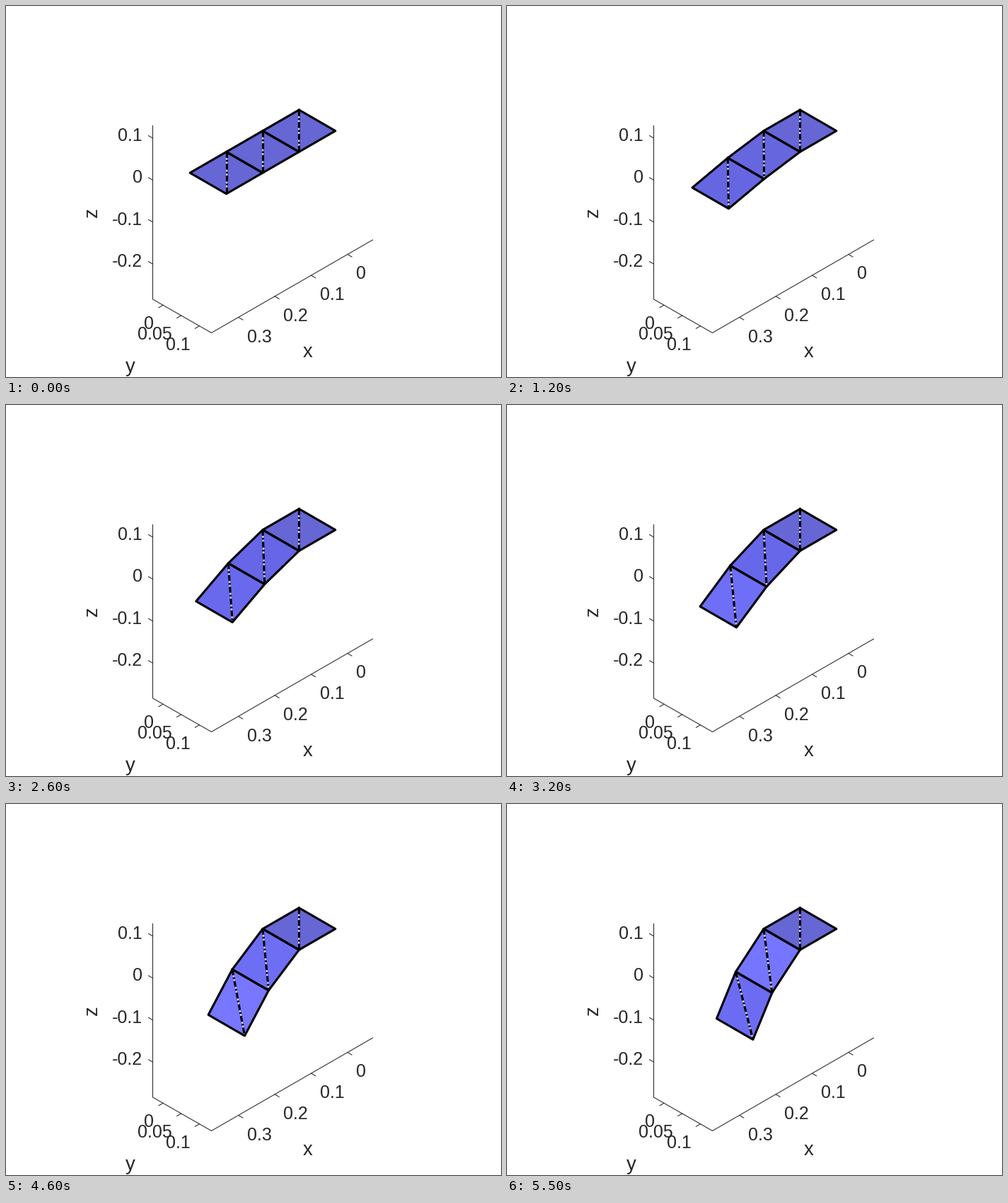
These frames come from a looping animation (700 by 525 pixels, 5.6 s). A matplotlib script:

```python
import numpy as np
import matplotlib.pyplot as plt
from matplotlib.animation import FuncAnimation
from matplotlib.patches import Polygon

W, H, DPI = 700, 525, 100
FRAMES, INTERVAL = 56, 100
PX = 72 / DPI                       # points per pixel
INK = "#262626"

plt.rcParams["font.family"] = "Liberation Sans"
plt.rcParams["toolbar"] = "None"
fig = plt.figure(figsize=(W / DPI, H / DPI), dpi=DPI, facecolor="white")
ax = fig.add_axes([0, 0, 1, 1])
ax.set_xlim(0, W)
ax.set_ylim(H, 0)
ax.axis("off")

# isometric projection, lengths in panel sides
ORIGIN = np.array([414.4, 147.0])
EX = np.array([-51.4, 29.7])
EY = np.array([51.4, 29.7])
EZ = np.array([0, -59.4])

RATES = np.radians([0, 0.722, 1.06])   # tilt of each panel per step
VIEW = np.ones(3) / np.sqrt(3)
LIGHT = np.array([1, 0, 1]) / np.sqrt(2)


def shade(tilt):
    """Lit blue face, 60 % opaque on white."""
    n = np.array([np.sin(tilt), 0, np.cos(tilt)])
    cos_l = n @ LIGHT
    mirror = 2 * cos_l * n - LIGHT
    spec = 0.9 * max(mirror @ VIEW, 0) ** 10
    lit = np.array([0, 0, 0.3 + 0.6 * cos_l]) + spec
    return 0.4 + 0.6 * np.clip(lit, 0, 1)


def line(points, width=1.05, color=INK, **kw):
    x, y = zip(*points)
    return ax.plot(x, y, color=color, lw=width * PX, **kw)[0]


def label(x, y, text, size=25, **kw):
    ax.text(x, y, text, fontsize=size * PX, color=INK, **kw)


def draw_axes():
    line([(207.5, 169.5), (207.5, 415), (290.5, 462.5), (518.5, 331)],
         solid_joinstyle="miter")
    for i, text in enumerate(["0.1", "0", "-0.1", "-0.2"]):
        y = 187 + 59.4 * i
        line([(207.5, y), (201.5, y - 3.5)])
        label(193.2, y + 4, text, ha="right", va="baseline")
    for i, text in enumerate(["0", "0.05", "0.1"]):
        x, y = 222 + 25.7 * i, 423.3 + 14.75 * i
        line([(x, y), (x - 6, y + 3.5)])
        label(209.4 + 25.7 * i, 457.3 + 14.9 * i, text,
              ha="right", va="baseline")
    for i, text in enumerate(["0", "0.1", "0.2", "0.3"]):
        x, y = 483 - 51.4 * i, 351.5 + 29.7 * i
        line([(x, y), (x + 6, y + 3.5)])
        label(495.2 - 51.4 * i, 386.5 + 29.7 * i, text,
              ha="left", va="baseline")
    label(427, 497, "x", 27.5, ha="center", va="baseline")
    label(176, 518, "y", 27.5, ha="center", va="baseline")
    label(135, 292, "z", 27.5, ha="right", va="center", rotation=90)


draw_axes()

START = [(0, 0), (0, 0)]
faces, seams, edges, folds = [], [], [], []
for _ in RATES:
    faces.append(ax.add_patch(Polygon([(0, 0)] * 4, lw=0, zorder=3)))
    seams.append(line(START, 1.8, "#d8d8e8", zorder=4,
                      solid_capstyle="butt"))
    edges.append(line(START, 3.1, "black", zorder=6,
                      solid_joinstyle="round", solid_capstyle="round"))
    folds.append(line(START, 3.1, "black", zorder=5,
                      linestyle=(0, (2.7, 0.95, 0.8, 0.95)),
                      dash_capstyle="butt"))


def update(step):
    p = ORIGIN
    for rate, face, seam, edge, fold in zip(RATES, faces, seams, edges, folds):
        tilt = rate * step
        q = p + np.cos(tilt) * EX - np.sin(tilt) * EZ
        quad = np.array([p, q, q + EY, p + EY])
        face.set_xy(quad)
        face.set_facecolor(shade(tilt))
        edge.set_data(*np.vstack([quad, quad[:1]]).T)
        for diagonal in (seam, fold):
            diagonal.set_data(*quad[[0, 2]].T)
        p = q
    return faces + seams + edges + folds


def reset():
    return update(0)


anim = FuncAnimation(fig, update, frames=FRAMES, init_func=reset,
                     interval=INTERVAL, repeat=True, repeat_delay=0,
                     blit=False)
plt.show()
```
